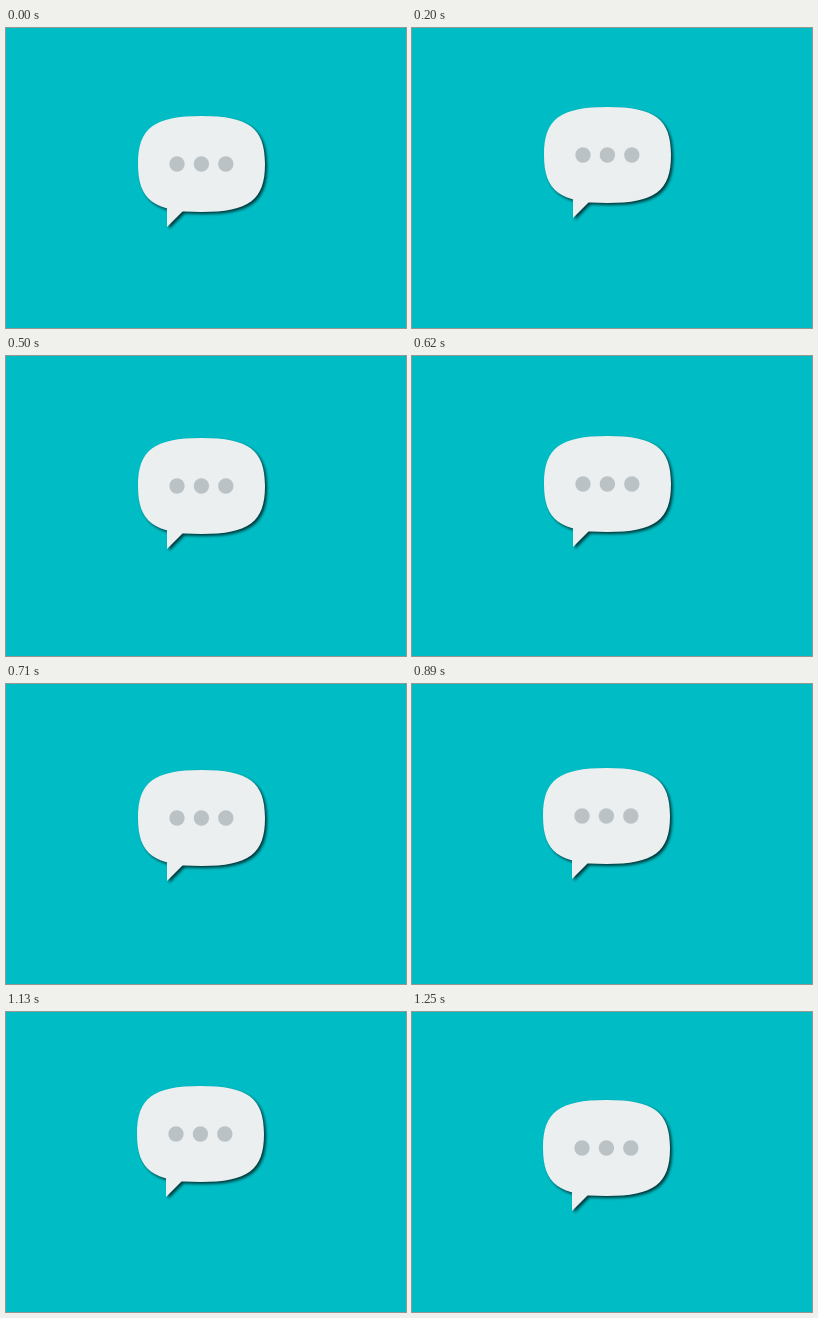
These frames come from a looping animation (400 px wide and 300 px high, 1750 ms). An HTML page:

```html
<!DOCTYPE html>
<html lang="en">
<head>
<meta charset="utf-8">
<title>Hopping speech bubble</title>
<style>
  html, body { margin: 0; width: 100%; height: 100%; overflow: hidden; background: #00bdc5; }
  svg { display: block; width: 400px; height: 300px; }
  .balloon { fill: #ebeff0; filter: drop-shadow(2px 2px 1.4px rgba(0, 0, 0, .7)); }
  .dots { fill: #bbc2c6; }
</style>
</head>
<body>
<svg viewBox="0 0 400 300">
  <g id="bubble">
    <path class="balloon" d="M132 136C132 100 148 88 195.5 88S259 100 259 136S243 184 195.5 184S132 172 132 136Z
      M177 183L161 199V175H177Z"/>
    <g class="dots">
      <circle cx="171" cy="136" r="7.7"/>
      <circle cx="195.4" cy="136" r="7.7"/>
      <circle cx="219.8" cy="136" r="7.7"/>
    </g>
  </g>
</svg>
<script>
const LOOP = 1750, STEP = 30, START = 140, LAST = 37;
// [step, height] pairs, joined by straight lines
const hops = [[0, 0], [3, 13], [9, 0], [15, 12], [18, 0], [23, 12], [26, 0], [32, 18], [LAST, 0]];
const bubble = document.getElementById('bubble');

function height(step) {
  const i = Math.max(1, hops.findIndex(([s]) => s >= step));
  const [s0, h0] = hops[i - 1], [s1, h1] = hops[i];
  return h0 + (h1 - h0) * (step - s0) / (s1 - s0);
}

function draw(now) {
  const t = now % LOOP;
  const step = Math.min(LAST, Math.max(0, Math.floor((t - START) / STEP)));
  const x = step > 21 ? -1 : 0;
  bubble.setAttribute('transform', `translate(${x} ${-Math.round(height(step))})`);
}

const begin = performance.now();
function tick() {
  draw(performance.now() - begin);
  requestAnimationFrame(tick);
}
tick();
</script>
</body>
</html>
```
